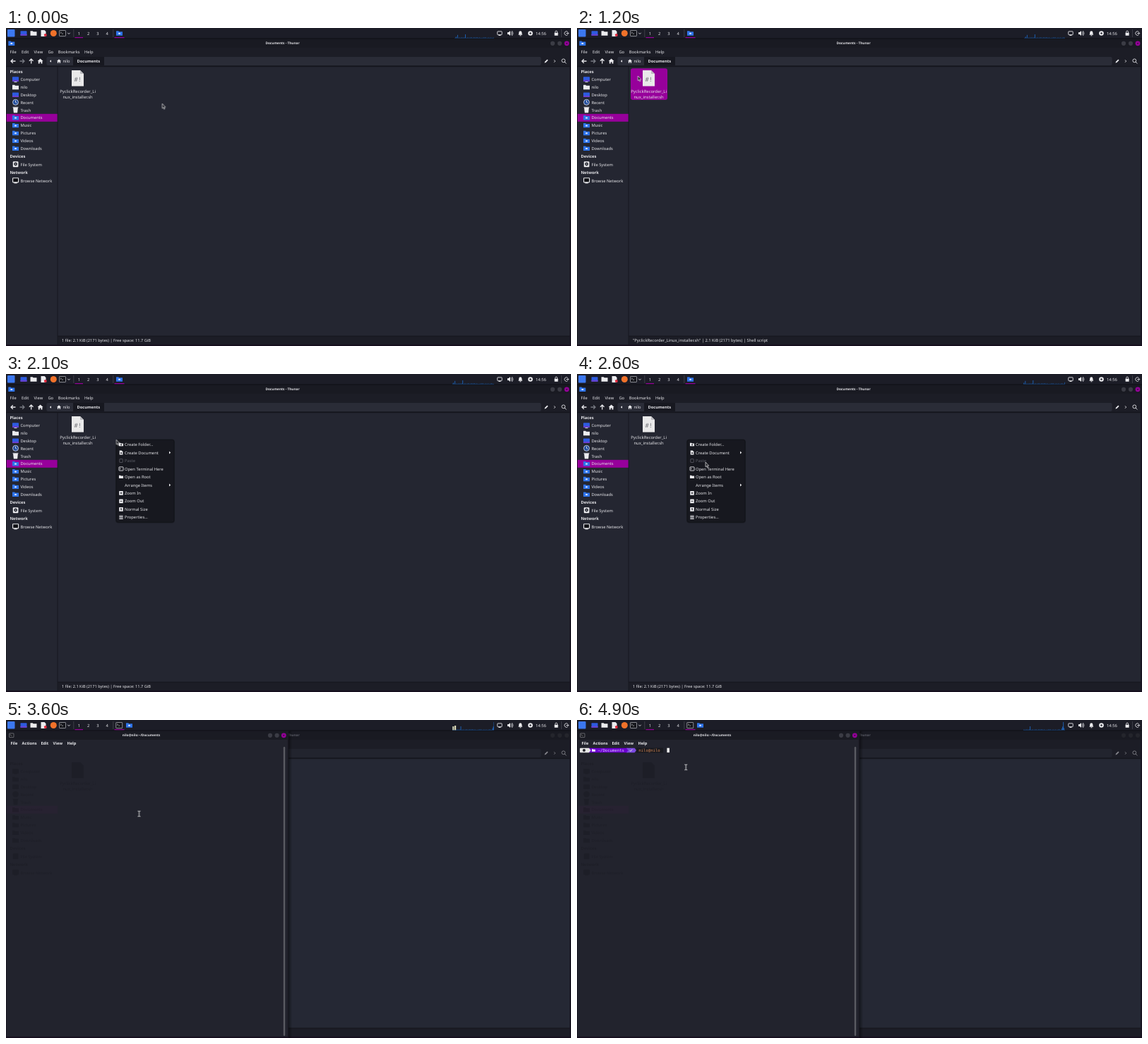
An HTML page that plays this animation: 800 by 451 pixels, repeating every 5 s.

```html
<!DOCTYPE html>
<html lang="en">
<head>
<meta charset="utf-8">
<title>Desktop</title>
<style>
html, body { margin: 0; width: 100%; height: 100%; overflow: hidden; background: #171820; }
svg { display: block; width: 100vw; height: 100vh; }
text { font: 5.8px "Noto Sans", "Open Sans", sans-serif; fill: #e4e4e8; text-rendering: geometricPrecision; white-space: pre; }
.b { font-weight: 700; }
.t { font-size: 4.75px; font-weight: 700; }
.f { font-size: 5.9px; text-anchor: middle; }
.m { font-family: "DejaVu Sans Mono", "Noto Sans Mono", monospace; font-size: 5.65px; }
.off { fill: #5d5f68; }
.line { fill: none; stroke: #e4e4e8; stroke-width: .9; }
.ghost { filter: brightness(0); opacity: .13; }

.step { animation: 5s step-end infinite; }
.idle { animation-name: idle; }
.picked { animation-name: picked; }
.hint { animation-name: hint; }
.menu { animation-name: menu; }
.hover { animation-name: hover; }
.files { animation-name: files; }
.term { animation-name: term; }
.fade { animation-name: fade; }
.prompt { animation-name: prompt; }
.tray { animation-name: tray; }
.arrow { animation-name: arrow; }
.hand { animation-name: hand; }
.beam { animation-name: term; }
@keyframes idle { 0% { opacity: 1 } 22% { opacity: 0 } 36% { opacity: 1 } 54% { opacity: 0 } 66%, 100% { opacity: 1 } }
@keyframes picked { 0% { opacity: 0 } 22% { opacity: 1 } 36%, 100% { opacity: 0 } }
@keyframes hint { 0% { opacity: 0 } 54% { opacity: 1 } 66%, 100% { opacity: 0 } }
@keyframes menu { 0% { opacity: 0 } 40% { opacity: 1 } 66%, 100% { opacity: 0 } }
@keyframes hover {
  0% { opacity: 0; transform: translateY(0) }
  46% { opacity: 1; transform: translateY(0) }
  48% { opacity: 1; transform: translateY(11.5px) }
  50% { opacity: 0; transform: translateY(34.5px) }
  54%, 100% { opacity: 1; transform: translateY(34.5px) }
}
@keyframes files { 0% { opacity: 1 } 70%, 100% { opacity: 0 } }
@keyframes term { 0% { opacity: 0 } 70%, 100% { opacity: 1 } }
@keyframes fade { 0% { opacity: 1 } 70%, 100% { opacity: .5 } }
@keyframes prompt { 0% { opacity: 0 } 76%, 100% { opacity: 1 } }
@keyframes tray { 0% { opacity: 0 } 72% { opacity: 1 } 84%, 100% { opacity: 0 } }
@keyframes arrow { 0% { opacity: 1 } 62%, 100% { opacity: 0 } }
@keyframes hand { 0% { opacity: 0 } 62% { opacity: 1 } 70%, 100% { opacity: 0 } }

.load { animation: load 5s steps(50) infinite; }
@keyframes load { to { transform: translateX(-9.1px) } }

.mouse { animation: mouse 5s infinite; }
@keyframes mouse {
  0% { transform: translate(221.3px, 107.3px); animation-timing-function: steps(6) }
  12% { transform: translate(164px, 110px); animation-timing-function: steps(6) }
  24% { transform: translate(86.3px, 68px); animation-timing-function: steps(4) }
  32%, 44% { transform: translate(156.3px, 93.3px); animation-timing-function: steps(5) }
  54%, 74% { transform: translate(188.5px, 133px); animation-timing-function: steps(6) }
  80% { transform: translate(181.7px, 125.3px); animation-timing-function: steps(3) }
  86%, 100% { transform: translate(154.2px, 67px) }
}
</style>
</head>
<body>
<svg id="stage" viewBox="0 0 800 451" preserveAspectRatio="none"></svg>
<script>
const USER = 'nilo', PURPLE = '#97009b', BLUE = '#2f74ea', WHITE = '#ececef', PANE = '#242631';

const rect = (x, y, w, h, fill, r = 0, more = '') =>
  `<rect x="${x}" y="${y}" width="${w}" height="${h}" fill="${fill}" rx="${r}" ${more}/>`;
const dot = (x, y, r, fill, more = '') => `<circle cx="${x}" cy="${y}" r="${r}" fill="${fill}" ${more}/>`;
const text = (x, y, s, cls = '', more = '') => `<text x="${x}" y="${y}" class="${cls}" ${more}>${s}</text>`;
const path = (d, more = 'class="line"') => `<path d="${d}" ${more}/>`;
const at = (x, y, s) => `<g transform="translate(${x} ${y})">${s}</g>`;
const step = (name, s) => `<g class="step ${name}">${s}</g>`;

const folder = (x, y, fill, glyph = '') => at(x, y,
  path('M-4.5-3.2h3.2l1 1h4.8v5.4h-9z', `fill="${fill}"`) + glyph);
const blueFolder = (x, y) => folder(x, y, BLUE, rect(-1.4, -.7, 2.8, 2, '#dbe7ff', .5));
const desk = (x, y) => at(x, y, rect(-4.5, -3.3, 9, 6.6, '#2d5be0', .6) + rect(-4.5, 1.2, 9, 2.1, '#6b3fd0', .6));
const shell = (x, y) => at(x, y,
  rect(-4.5, -4, 9, 8, '#15161c', .6, 'stroke="#b9bac0" stroke-width=".7"') +
  path('M-3-2l1.4 1.1L-3 .2M-1 .6h2', 'fill="none" stroke="#e4e4e8" stroke-width=".6"'));
const cross = (x, y, fill, ink) => dot(x, y, 3.4, fill) +
  path(`M${x - 1.2} ${y - 1.2}l2.4 2.4m0-2.4l-2.4 2.4`, `stroke="${ink}" stroke-width=".6"`);
const underline = (x, w) => rect(x, 13, w, 1.2, PURPLE);

function loadBars() {
  let seed = 7, s = '';
  const rnd = () => (seed = seed * 16807 % 2147483647) / 2147483647;
  const peaks = { 637: 2, 639: 4.6, 650: 5.4, 695: 2.6, 696: 5, 697: 11.5, 698: 3 };
  for (let x = 635; x < 702; x++) {
    const h = peaks[x] || .3 + rnd() * .6;
    s += rect(x, 14.4 - h, .8, h, '#1e6fd0');
  }
  return s;
}

function panel() {
  let s = rect(0, 0, 800, 14.5, '#1c1d27') + rect(0, 14.5, 800, 1, '#101117');
  s += rect(2, 2, 10.5, 10.5, '#3c78f0', 1) + desk(25, 7.5) + folder(39, 7.5, WHITE);
  s += path('M49.5 3h5l2 2v7h-7z', `fill="${WHITE}"`) + dot(55.8, 10, 2, '#e0283c');
  s += dot(67.3, 7.5, 4.5, '#f0722a') + shell(80, 7.5) + path('M87.3 6.8l1.7 1.7 1.7-1.7');
  s += [95.5, 151.5, 786].map(x => rect(x, 2, .7, 11, '#4a4b55')).join('');
  s += [103.3, 116.6, 130, 143.2].map((x, i) => text(x, 9.7, i + 1, '', 'text-anchor="middle"')).join('');
  s += underline(97.5, 11.5) + underline(153.5, 14);
  s += step('files', blueFolder(160.5, 7.5)) + step('term', shell(160.2, 7.5) + blueFolder(174.5, 7.5));
  s += `<g clip-path="url(#graph)"><g class="load">${loadBars()}</g></g>`;
  s += step('tray', rect(632.3, 9, 2, 5.3, '#d8d6b4') + rect(635, 8, 2.2, 6.3, '#d8d6b4'));
  s += rect(695.8, 4.8, 6.4, 4.8, 'none', .6, 'class="line"') + rect(697.5, 10, 3, .9, WHITE);
  s += path('M710 6h1.8l2.2-2v7l-2.2-2H710z', `fill="${WHITE}"`) + path('M715.3 5.5q1.5 2 0 4m1.2-5.4q2.6 3.4 0 6.8');
  s += path('M725.2 9.8q1-.8 1-3.2a2.1 2.4 0 0 1 4.2 0q0 2.4 1 3.2zM727.5 10.3h1.8v1h-1.8z', `fill="${WHITE}"`);
  s += dot(742.5, 7.5, 3.3, WHITE) + dot(742.5, 7.5, 1.2, '#1c1d27') + text(750, 9.7, '14:56');
  s += rect(776.6, 6.8, 5, 4, WHITE, .5) + path('M777.6 7V5.6a1.5 1.5 0 0 1 3 0V7');
  return s + path('M795.4 5.4a2.8 2.8 0 1 0 0 4.2M793.2 7.5h3.4m-1.2-1.3l1.3 1.3-1.3 1.3');
}

function sidebar() {
  const rows = [
    [73, 'Computer', desk(13.5, 72.5) + rect(11.5, 76, 4, .9, WHITE)],
    [84, USER, folder(13.5, 84, WHITE)],
    [95, 'Desktop', desk(13.5, 94.7)],
    [105.6, 'Recent', dot(13.5, 105.3, 4, '#244f9e', 'stroke="#dfe3ee" stroke-width=".8"') + path('M13.5 102.8v2.6l1.8 1')],
    [116.5, 'Trash', path('M10 112.5h7l-.9 7.8h-5.2z', `fill="${WHITE}"`) + rect(9.5, 111.8, 8, 1.1, '#b9bac0')],
    ...['Documents', 'Music', 'Pictures', 'Videos', 'Downloads'].map((n, i) =>
      [127.3 + i * 10.85, n, blueFolder(13.5, 127.3 + i * 10.85)]),
    [193.5, 'File System', rect(9.8, 189.3, 7.6, 8, WHITE, 1) + dot(13.6, 193, 2.4, PANE) + dot(13.6, 193, .8, WHITE)],
    [216.5, 'Browse Network', rect(9.6, 212.7, 8, 6.2, '#0f1015', .6, `stroke="${WHITE}" stroke-width="1.1"`) + rect(11.5, 219, 4.2, 1.4, WHITE)]
  ];
  return rows.map(([y, name, icon]) => icon + text(20.4, y + 2, name)).join('') +
    [[63.7, 'Places'], [184.4, 'Devices'], [207.3, 'Network']].map(([y, n]) => text(5.4, y, n, 'b')).join('');
}

const scriptFile = () =>
  path('M93 60h12l5 5v17.5H93z', 'fill="#e9e9ea"') + path('M105 60l5 5h-5z', 'fill="#bcbcc0"') +
  text(101.8, 75.6, '#!', 'm', 'text-anchor="middle" style="font-size:8.6px;fill:#77787e"') +
  text(101.6, 91.8, 'PyclickRecorder_Li', 'f') + text(101.6, 99.7, 'nux_installer.sh', 'f');

function manager() {
  let s = rect(0, 15.5, 800, 435.5, '#191a22') + rect(0, 28, 800, 25.5, '#1c1d26');
  s += rect(57.5, 41, 700, 12, '#22242e', 2) + step('files', rect(57.5, 41, 700, 12, '#2a2c37', 2)) + rect(95, 41, 44, 12, '#171820');
  s += rect(1, 55, 797, 382, PANE) + step('term', rect(400, 55, 398, 382, '#252834')) + rect(72.6, 55, .8, 394, '#15161c');
  s += rect(0, 54.4, 800, .8, '#14151b') + rect(73.4, 437, 725, 12, '#1c1d26') + rect(73.4, 436.6, 725, .8, '#121318');
  s += rect(1, 437, 71.6, 12, PANE) + rect(0, 449, 800, 2, '#160f1e') + rect(798, 28, 2, 421, '#171420');
  s += step('files', text(391.5, 23.4, 'Documents - Thunar', 't', 'text-anchor="middle"') +
    dot(774, 21.8, 3.1, '#3b3c45') + dot(784, 21.8, 3.1, '#3b3c45') + cross(794, 21.8, PURPLE, '#1a1020') + blueFolder(7.8, 21.8));
  s += step('term', text(391.5, 23.4, 'Documents - Thunar', 't off', 'text-anchor="middle"') +
    [774, 784, 794].map(x => dot(x, 21.8, 3.1, '#24252c')).join(''));
  s += [[5.4, 'File'], [22, 'Edit'], [39.6, 'View'], [59.4, 'Go'], [73.8, 'Bookmarks'], [111, 'Help']]
    .map(([x, n]) => text(x, 35.8, n)).join('');
  s += path('M13.5 47H7m2.8-2.8L7 47l2.8 2.8', 'fill="none" stroke="#e4e4e8" stroke-width="1.3"');
  s += path('M19.5 47H26m-2.8-2.8L26 47l-2.8 2.8', 'fill="none" stroke="#777982" stroke-width="1.3"');
  s += path('M35.7 50.4V44m-2.8 2.8l2.8-2.8 2.8 2.8', 'fill="none" stroke="#e4e4e8" stroke-width="1.3"');
  const home = 'M0-3.8L4-.2H2.8v3.6H.9V1H-.9v2.4h-1.9V-.2H-4z';
  s += at(48.6, 47.2, path(home, `fill="${WHITE}"`)) + at(75, 47.2, path(home, `fill="${WHITE}" transform="scale(.75)"`));
  s += path('M64 45.2L61.8 47l2.2 1.8z', `fill="${WHITE}"`) + text(80.4, 49.1, USER) + text(100.6, 49.1, 'Documents', 'b', 'style="font-size:5.7px"');
  s += step('fade', path('M762.5 49.5l.5-1.7 3.3-3.3 1.3 1.3-3.3 3.3z', `fill="${WHITE}"`) + path('M776 45.3l1.7 1.7-1.7 1.7') +
    dot(789.3, 46.3, 2.4, 'none', 'class="line"') + path('M791 48l2.4 2.5'));
  s += rect(.8, 121.8, 71.8, 11, PURPLE) + step('picked', rect(76, 57.3, 52, 44.7, PURPLE, 3));
  s += `<g id="ghost">${sidebar()}${scriptFile()}</g>`;
  s += step('idle', text(79, 445.4, '1 file: 2.1 KiB (2171 bytes) | Free space: 11.7 GiB', '', 'style="font-size:5.63px"'));
  s += step('picked', text(79, 445.4, '"PyclickRecorder_Linux_installer.sh" | 2.1 KiB (2171 bytes) | Shell script'));
  return s + step('hint', text(79, 445.4, 'Example for a custom action'));
}

function popup() {
  const names = ['Create Folder...', 'Create Document', 'Paste', 'Open Terminal Here', 'Open as Root',
    'Arrange Items', 'Zoom In', 'Zoom Out', 'Normal Size', 'Properties...'];
  const plus = 'M-1.3 0h2.6M0-1.3v2.6', ink = 'stroke="#17181f" stroke-width=".9"';
  const tile = d => rect(-2.8, -2.8, 5.6, 5.6, WHITE, .5) + path(d, ink);
  const small = s => `<g transform="scale(.68)">${s}</g>`;
  const icons = [
    small(folder(0, 0, WHITE)) + path('M-.9.4h2M.1-.6v2', ink),
    path('M-2.3-3h3l1.7 1.7V3h-4.7z', `fill="${WHITE}"`) + path('M-1 .7h2.2M.1-.4v2.2', ink),
    rect(-2.2, -2.4, 4.4, 4.9, 'none', .4, 'stroke="#5d5f68" stroke-width=".8"'),
    rect(-3, -2.6, 6, 5.2, 'none', .5, 'class="line"') + path('M-1.7-1l1 .9-1 .9'),
    small(folder(0, 0, WHITE)), '', tile(plus), tile('M-1.3 0h2.6'), tile('M-.6-.8L.2-1.3V1.5'),
    path('M-2.7-2.3h5.4M-2.7-.8h5.4M-2.7.8h5.4M-2.7 2.3h5.4')
  ];
  let s = rect(155, 92.5, 84, 119, '#000', 4, 'opacity=".25"') +
    rect(156, 93.2, 82, 117, '#17181f', 3, 'stroke="#101117" stroke-width=".6"');
  s += `<g class="step hover">${rect(156.8, 94.3, 81, 11.3, PURPLE)}</g>`;
  names.forEach((name, i) => {
    const y = 100 + i * 11.48;
    s += at(163, y, icons[i]) + text(168, y + 2.1, name, i === 2 ? 'off' : '');
    if (i === 1 || i === 5) s += path(`M231 ${y - 2}l2.2 2-2.2 2z`, `fill="${WHITE}"`);
  });
  return s;
}

function terminal() {
  let s = rect(400, 15.5, 5, 435.5, 'url(#shade)') + rect(0, 15.5, 400, 435.5, '#22232d');
  s += rect(0, 15.5, 400, 12.5, '#1a1b23') + rect(0, 449, 400, 2, '#160f1e') + rect(0, 28, .8, 421, '#17131e') + rect(398.8, 28, 1.2, 421, '#191821');
  s += rect(1, 121.8, 72, 11, PURPLE, 0, 'opacity=".04"') + '<use href="#ghost" class="ghost"/>';
  s += at(7.8, 21.8, `<g transform="scale(.7)">${shell(0, 0)}</g>`);
  s += text(191.5, 23.4, USER + '@' + USER + ':~/Documents', 't', 'text-anchor="middle" style="font-size:4.6px"');
  s += dot(374, 21.8, 3.1, '#3b3c45') + dot(383.6, 21.8, 3.1, '#3b3c45') + cross(393.3, 21.8, PURPLE, '#1a1020');
  s += [[6.4, 'File'], [22.6, 'Actions'], [49.4, 'Edit'], [66.6, 'View'], [86.4, 'Help']]
    .map(([x, n]) => text(x, 34.8, n, '', 'style="font-size:5.65px;font-weight:600"')).join('');
  s += rect(392.8, 38, 2.4, 410, '#5a5b62', 1.2);
  let p = rect(84, 39.5, 38, 7, '#191a20') + rect(4, 39.8, 13.5, 6.4, '#e6e6e6', 1) + dot(10, 43, 2, '#25262c');
  p += rect(17, 39.8, 55, 6.4, '#6d00cf') + path('M17 39.8l2.6 3.2-2.6 3.2z', 'fill="#e6e6e6"');
  p += path('M70 39.8h11.5l2.5 3.2-2.5 3.2H70l2.4-3.2z', 'fill="#7d4be0"');
  p += `<g transform="translate(23.5 43) scale(.55)">${folder(0, 0, '#f0e8ff')}</g>` + text(29.6, 45, '~/Documents', 'm', 'style="fill:#d9c2ff"');
  p += path('M74.5 43l1.3 1.4 2.5-2.8') + text(87.2, 45, USER + '@' + USER, 'm', 'style="fill:#d08252"');
  p += rect(127.4, 39.7, 3.5, 6.4, '#f2f2f2');
  return s + step('prompt', p);
}

function mouse() {
  const edge = 'fill="#15161c" stroke="#f4f4f4" stroke-width=".7" stroke-linejoin="round"';
  return step('arrow', path('M0 0v6.6l1.4-1.2 1.1 2.4 1.1-.5-1.1-2.3h2z', edge)) +
    step('hand', path('M-.8.2q.9-.9 1.7 0v3l3 .7q.7.3.6 1.2L4 8.2H.7L-1.8 5.3q.1-1 1-.6z', edge)) +
    step('beam', path('M-1.9-3.8h1.4l.5.5.5-.5h1.4M0-3.3v6.6M-1.9 3.8h1.4l.5-.5.5.5h1.4',
      'fill="none" stroke="#f0f0f0" stroke-width=".9"'));
}

document.getElementById('stage').innerHTML =
  `<defs><clipPath id="graph"><rect x="632" y="1" width="59" height="14"/></clipPath>
   <linearGradient id="shade"><stop stop-color="#000" stop-opacity=".4"/><stop offset="1" stop-color="#000" stop-opacity="0"/></linearGradient></defs>` +
  manager() + step('menu', popup()) + step('term', terminal()) + panel() + `<g class="mouse">${mouse()}</g>`;
</script>
</body>
</html>
```
